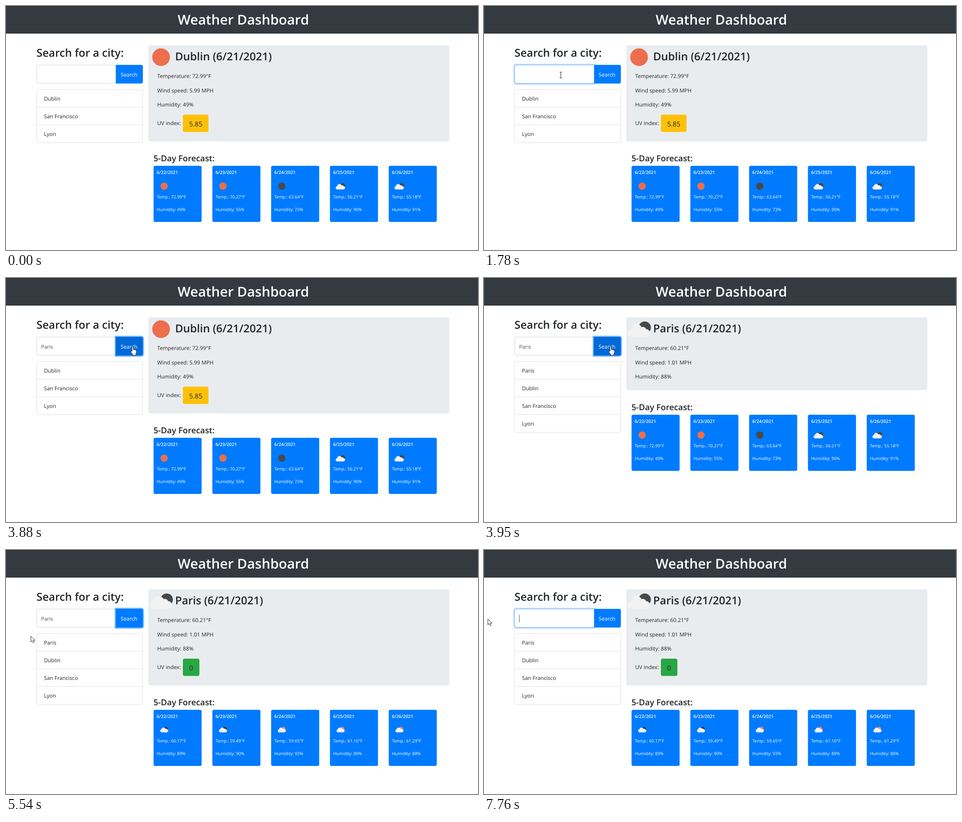
An HTML page that plays this animation: 1038 px wide and 539 px high, repeating every 8 s.

```html
<!DOCTYPE html>
<html lang="en">
<head>
<meta charset="utf-8">
<title>Weather Dashboard</title>
<style>
  html, body { margin: 0; width: 100%; height: 100%; overflow: hidden; background: #fff; }
  svg { display: block; width: 1038px; height: 539px; }
  text { font: 11.8px "Open Sans", "Noto Sans", sans-serif; fill: #212529; text-rendering: geometricPrecision; white-space: pre; }
  .title { font-size: 29.9px; font-weight: 600; fill: #fff; }
  .h2 { font-size: 24px; font-weight: 600; }
  .h3 { font-size: 18.3px; font-weight: 600; }
  .date { font-size: 9.8px; font-weight: 600; fill: #fff; }
  .small { font-size: 9.4px; font-weight: 500; fill: #fff; }
  .uv { font-size: 14.7px; }
  .query { font-size: 11.4px; fill: #495057; }
  .light { fill: #fff; }

  /* 1% = 80 ms */
  .step, .ease { animation: 8s step-end infinite; }
  .ease { animation-timing-function: linear; }

  .before { animation-name: before; }
  .after { animation-name: after; }
  .old { animation-name: old; }
  .new { animation-name: new; }
  @keyframes before { 0% { opacity: 1 } 49.375%, 100% { opacity: 0 } }
  @keyframes after { 0% { opacity: 0 } 49.375%, 100% { opacity: 1 } }
  @keyframes old { 0% { opacity: 1 } 52.625%, 100% { opacity: 0 } }
  @keyframes new { 0% { opacity: 0 } 52.625%, 100% { opacity: 1 } }

  #panel { animation-name: panel; }
  #forecast { animation-name: lift; }
  @keyframes panel { 0%, 52.625%, 100% { height: 212px } 49.375% { height: 161px } }
  @keyframes lift { 0%, 52.625%, 100% { transform: none } 49.375% { transform: translateY(-51px) } }

  #inputFocus { animation-name: inputFocus; }
  #buttonGlow { animation-name: buttonGlow; }
  #hover { animation-name: hover; }
  @keyframes inputFocus {
    0%, 15.625% { opacity: 0 } 17.7%, 46.25% { opacity: 1 }
    48.125%, 76% { opacity: 0 } 78%, 100% { opacity: 1 }
  }
  @keyframes buttonGlow { 0%, 46.25% { opacity: 0 } 48.125%, 76% { opacity: 1 } 78%, 100% { opacity: 0 } }
  @keyframes hover { 0%, 43.2% { opacity: 0 } 45.1%, 58.75% { opacity: 1 } 60.6%, 100% { opacity: 0 } }

  #k0 { animation-name: k0; } #k1 { animation-name: k1; } #k2 { animation-name: k2; }
  #k3 { animation-name: k3; } #k4 { animation-name: k4; }
  @keyframes k0 { 0%, 97%, 100% { fill-opacity: 0 } 25.5% { fill-opacity: 1 } }
  @keyframes k1 { 0%, 97%, 100% { fill-opacity: 0 } 28% { fill-opacity: 1 } }
  @keyframes k2 { 0%, 97%, 100% { fill-opacity: 0 } 29.625% { fill-opacity: 1 } }
  @keyframes k3 { 0%, 97%, 100% { fill-opacity: 0 } 31.375% { fill-opacity: 1 } }
  @keyframes k4 { 0%, 97%, 100% { fill-opacity: 0 } 33% { fill-opacity: 1 } }

  #caret { animation-name: caret; }
  @keyframes caret {
    0% { opacity: 0; transform: none }
    15.625% { opacity: 1; transform: none }
    22.25% { opacity: 0; transform: none }
    25.5% { opacity: 1; transform: translateX(7px) }
    28% { opacity: 1; transform: translateX(13px) }
    29.625% { opacity: 1; transform: translateX(18px) }
    31.375% { opacity: 1; transform: translateX(21px) }
    33% { opacity: 1; transform: translateX(26px) }
    39.625% { opacity: 0; transform: translateX(26px) }
    97%, 100% { opacity: 1; transform: none }
  }

  /* text selected by dragging left, then deleted */
  #selected { animation-name: selected; }
  #selectBox { transform-origin: 104px 0; animation-name: selectBox; }
  @keyframes selected { 0%, 97%, 100% { opacity: 0 } 77.4% { opacity: 1 } }
  @keyframes selectBox { 0%, 76.4% { transform: scaleX(0) } 77.4%, 100% { transform: none } }

  #cursor { animation-name: move; }
  @keyframes move {
    0%, 2.375% { transform: translate(803px, 401px) }
    5% { transform: translate(640px, 350px) }
    7.5% { transform: translate(455px, 283px) }
    9.375% { transform: translate(303px, 216px) }
    10.9% { transform: translate(208px, 165px) }
    12.125% { transform: translate(169px, 153px) }
    13.125%, 38.9% { transform: translate(169px, 152px) }
    40.375% { transform: translate(195px, 153px) }
    41.625% { transform: translate(235px, 154px) }
    43.25% { transform: translate(262px, 153px) }
    45%, 51.8% { transform: translate(278px, 152px) }
    55.25% { transform: translate(271px, 152px) }
    57.5% { transform: translate(268px, 160px) }
    60% { transform: translate(263px, 235px) }
    62.25% { transform: translate(260px, 329px) }
    63.125% { transform: translate(240px, 327px) }
    65% { transform: translate(160px, 300px) }
    66.875% { transform: translate(75px, 255px) }
    68.125% { transform: translate(46px, 220px) }
    69.25% { transform: translate(54px, 190px) }
    70.625% { transform: translate(80px, 170px) }
    72.75%, 75.2% { transform: translate(112px, 159px) }
    80.375%, 100% { transform: translate(8px, 152px) }
  }
  #arrow { animation-name: arrow; }
  #beam { animation-name: beam; }
  #hand { animation-name: hand; }
  @keyframes arrow {
    0%, 10.7%, 70.5%, 100% { opacity: 0 }
    2.375%, 58.4%, 80.375% { opacity: 1 }
  }
  @keyframes beam {
    0%, 42%, 80.375%, 100% { opacity: 0 }
    10.7%, 70.5% { opacity: 1 }
  }
  @keyframes hand { 0%, 58.4%, 100% { opacity: 0 } 42% { opacity: 1 } }
</style>
</head>
<body>
<svg viewBox="0 0 1038 539">
  <defs>
    <g id="cloud" fill="#f2f2f2">
      <circle cx="8.5" cy="20.5" r="8.5"/>
      <circle cx="19.5" cy="12.5" r="12"/>
      <circle cx="33.5" cy="14.5" r="7.5"/>
      <circle cx="40.5" cy="20.5" r="8.5"/>
      <path d="M8.5 12H33.5L40.5 20V29H8.5Z"/>
    </g>
    <g id="cloudy">
      <circle cx="37.5" cy="8.5" r="13.5" fill="#48484a"/>
      <use href="#cloud"/>
    </g>
    <path id="drops" d="M14 30l-2 5M25 30l-2 5M36 30l-2 5" fill="none" stroke="#d8dfe8" stroke-width="2.5"/>
    <g id="rainNight">
      <circle cx="35" cy="9" r="13" fill="#3b3b48"/>
      <use href="#cloud"/><use href="#drops"/>
    </g>
    <g id="rainDay">
      <circle cx="35" cy="9" r="13" fill="#ec8a4c"/>
      <use href="#cloud"/><use href="#drops"/>
    </g>
    <path id="inputShape" d="M242 130.5H71a3.5 3.5 0 0 0-3.5 3.5V167.3a3.5 3.5 0 0 0 3.5 3.5H242Z"/>
    <path id="buttonShape" d="M241.5 130H297a4 4 0 0 1 4 4V167.3a4 4 0 0 1-4 4H241.5Z"/>
  </defs>

  <rect width="1038" height="61" fill="#343a40"/>
  <rect width="1038" height="1" fill="#25292e"/>
  <text class="title" x="377.5" y="40.5">Weather Dashboard</text>

  <text class="h2" x="67" y="112">Search for a city:</text>
  <use href="#inputShape" fill="#fff" stroke="#ced4da"/>
  <use id="buttonGlow" class="ease" href="#buttonShape" fill="none" stroke="#007bff" stroke-opacity=".5" stroke-width="5.2"/>
  <use href="#buttonShape" fill="#007bff"/>
  <use id="hover" class="ease" href="#buttonShape" fill="#0069d9"/>
  <text class="light" x="252" y="155.5">Search</text>
  <g id="inputFocus" class="ease">
    <use href="#inputShape" fill="none" stroke="#007bff" stroke-opacity=".25" stroke-width="6.2"/>
    <use href="#inputShape" fill="#fff" stroke="#80bdff"/>
  </g>
  <text class="query" x="77.3" y="156.3"><tspan id="k0" class="step">P</tspan><tspan id="k1" class="step">a</tspan><tspan id="k2" class="step">r</tspan><tspan id="k3" class="step">i</tspan><tspan id="k4" class="step">s</tspan></text>
  <g id="selected" class="step">
    <rect id="selectBox" class="ease" x="77" y="143" width="27" height="17" fill="#0078d7"/>
    <text class="query light" x="77.3" y="156.3">Paris</text>
  </g>
  <rect id="caret" class="step" x="77.2" y="143" width="1" height="17" fill="#495057"/>

  <g id="listOld" class="step before"></g>
  <g id="listNew" class="step after"></g>

  <rect id="panel" class="step" x="313" y="87" width="662" height="212" rx="4" fill="#e9ecef"/>
  <g class="step before">
    <circle cx="341" cy="113" r="19.5" fill="#ec6e4c"/>
    <text class="h2" x="372" y="120.3">Dublin (6/21/2021)</text>
    <text x="332.5" y="158.7">Temperature: 72.99°F</text>
    <text x="332.5" y="190.6">Wind speed: 5.99 MPH</text>
    <text x="332.5" y="222.4">Humidity: 49%</text>
    <text x="332.5" y="262.5">UV index:</text>
    <rect x="389" y="240" width="56.3" height="38.3" rx="4" fill="#ffc107"/>
    <text class="uv" x="402.7" y="265.5">5.85</text>
  </g>
  <g class="step after">
    <use href="#cloudy" x="316" y="101"/>
    <text class="h2" x="372" y="120.3">Paris (6/21/2021)</text>
    <text x="332.5" y="158.7">Temperature: 60.21°F</text>
    <text x="332.5" y="190.6">Wind speed: 1.01 MPH</text>
    <text x="332.5" y="222.4">Humidity: 88%</text>
  </g>
  <g class="step new">
    <text x="332.5" y="262.5">UV index:</text>
    <rect x="389" y="240" width="36.3" height="38.3" rx="4" fill="#28a745"/>
    <text class="uv" x="402.7" y="265.5">0</text>
  </g>

  <g id="forecast" class="step">
    <text class="h3" x="324.2" y="343.2">5-Day Forecast:</text>
    <g id="cards"></g>
    <g id="daysOld" class="step old"></g>
    <g id="daysNew" class="step new"></g>
  </g>

  <g id="cursor" class="ease">
    <path id="arrow" class="step" d="M.5 .5V13.2L3.5 10.5L5.5 15L7.7 14L5.7 9.7H9.6Z" fill="#fff" stroke="#111" stroke-width=".9"/>
    <path id="beam" class="step" d="M-2.5-6H-.7L0-5.4L.7-6H2.5M0-5.5V6.5M-2.5 7H-.7L0 6.4L.7 7H2.5" fill="none" stroke="#111"/>
    <path id="hand" class="step" d="M-1 1.2a1.5 1.5 0 0 1 3 0V6.5a1.4 1.4 0 0 1 2.6 .3a1.4 1.4 0 0 1 2.4 .6a1.3 1.3 0 0 1 2 1.2V13L7.5 16V18.5H.4V16.5L-3.6 11.3a1.4 1.4 0 0 1 2.6-1Z" fill="#fff" stroke="#111" stroke-width=".9"/>
  </g>
</svg>
<script>
  const fill = (id, html) => { document.getElementById(id).innerHTML = html; };
  const cardX = i => 324.5 + 129.3 * i;

  function list(names) {
    const row = 39.15, top = 184.5;
    const rows = names.map((name, i) =>
      (i ? `<path d="M67.5 ${Math.round(top + i * row) - .5}H300.5" stroke="#dfdfdf"/>` : '') +
      `<text x="83.5" y="${208.8 + i * row}">${name}</text>`);
    return `<rect x="67.5" y="${top}" width="233" height="${names.length * row}" rx="3.5" fill="#fff" stroke="#dfdfdf"/>` + rows.join('');
  }

  const disc = color => x => `<circle cx="${x + 23.3}" cy="398" r="8" fill="${color}"/>`;
  const icon = (id, dx, y, scale) => x =>
    `<use href="#${id}" transform="translate(${x + dx} ${y}) scale(${scale})"/>`;
  const sun = disc('#ec6e4c'), moon = disc('#48484a');
  const cloudy = icon('cloudy', 12.6, 393, .42);
  const rainNight = icon('rainNight', 14.6, 392, .36), rainDay = icon('rainDay', 14.6, 392, .36);

  const days = data => data.map(([draw, temp, humidity], i) => {
    const x = cardX(i);
    return draw(x) +
      `<text class="small" x="${x + 7}" y="425.2">Temp.: ${temp}°F</text>` +
      `<text class="small" x="${x + 7}" y="453.2">Humidity: ${humidity}%</text>`;
  }).join('');

  const cities = ['Dublin', 'San Francisco', 'Lyon'];
  fill('listOld', list(cities));
  fill('listNew', list(['Paris', ...cities]));
  fill('cards', [22, 23, 24, 25, 26].map((day, i) =>
    `<rect x="${cardX(i)}" y="353" width="105.7" height="124" rx="3.5" fill="#007bff"/>` +
    `<text class="date" x="${cardX(i) + 7}" y="370.7">6/${day}/2021</text>`).join(''));
  fill('daysOld', days([
    [sun, '72.99', 49], [sun, '70.27', 55], [moon, '63.64', 73],
    [cloudy, '56.21', 90], [cloudy, '55.18', 91]]));
  fill('daysNew', days([
    [rainNight, '60.17', 89], [rainNight, '59.49', 90], [rainDay, '59.65', 93],
    [rainDay, '61.16', 89], [rainDay, '61.29', 88]]));
</script>
</body>
</html>
```
